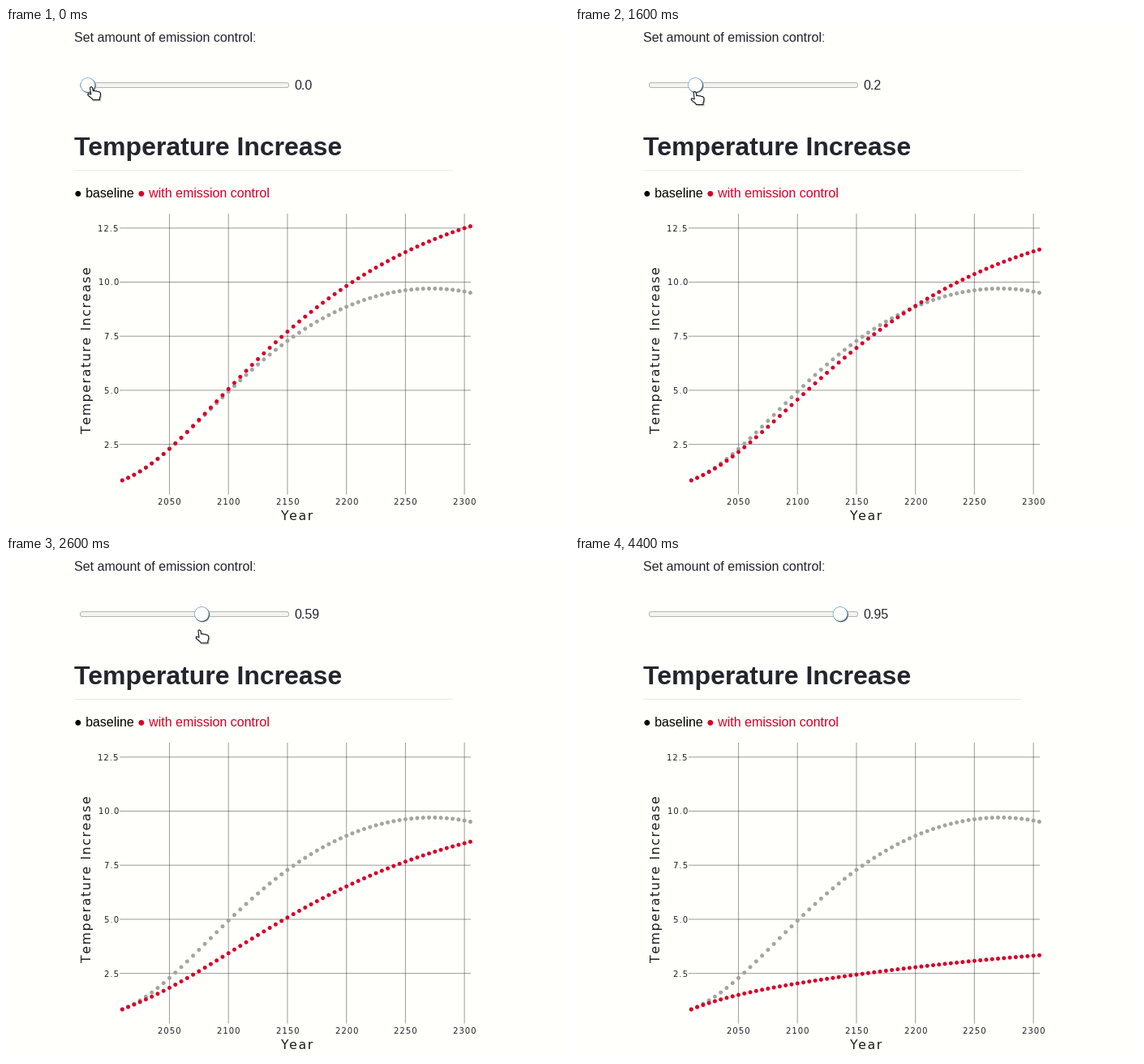
A matplotlib script for the animation above (4.8 s loop, 694x618 px).

```python
import numpy as np
import matplotlib.pyplot as plt
from matplotlib.animation import FuncAnimation
from matplotlib.patches import Circle, FancyBboxPatch, Polygon

W, H, DPI = 694, 618, 72  # at 72 dpi one point is one pixel
FRAMES, INTERVAL = 48, 100

PAPER, INK, AXIS_INK = "#fffffc", "#24252d", "#1c1c1c"
RED, GREY = "#d60027", "#a4a4a0"
SANS, PLOT_FONT = "Liberation Sans", "DejaVu Sans"

# Slider level and pointer x at the key ticks of the drag
KEYS = [5, 11, 16, 22, 29, 33]
LEVELS = [0, 0.1, 0.2, 0.45, 0.69, 0.95]
HAND_X = [100, 118, 142.5, 203, 256, 323]
EXIT_START, EXIT_STEPS = 40, 4

YEARS = np.arange(2010, 2306, 5)
CENTURIES = (YEARS - 2010) / 100


def year_x(year):
    return 201.5 + (year - 2050) * 1.4544


def temp_y(temp):
    return 513.6 - (temp - 2.5) * 26.68


def warming(share):
    """Temperature when this share of the emissions goes on."""
    c = CENTURIES
    carbon = c * (0.62 + 0.76 * c - 0.137 * c**2)
    response = 6 * (1 - np.exp(-c / 0.66))
    committed = 1.2 * (1 - np.exp(-c / 0.55))
    return 0.836 + committed + response * np.log(1 + carbon * share)


fig = plt.figure(figsize=(W / DPI, H / DPI), dpi=DPI, facecolor=PAPER)
ax = fig.add_axes([0, 0, 1, 1])
ax.set_xlim(0, W)
ax.set_ylim(H, 0)
ax.axis("off")


def write(x, y, text, size, color=INK, font=SANS, **kw):
    return ax.text(x, y, text, fontsize=size, color=color, family=font,
                   va="baseline", **kw)


def write_axis(x, y, text, size, **kw):
    """Chart text, letter-spaced with hair spaces."""
    write(x, y, "\u200a".join(text), size, AXIS_INK, PLOT_FONT, **kw)


def line(x0, y0, x1, y1, color, **kw):
    ax.plot([x0, x1], [y0, y1], color=color, snap=False,
            solid_capstyle="butt", **kw)


def points(temps):
    return np.column_stack([year_x(YEARS), temp_y(temps)])


def dots(temps, color):
    # One colour per dot keeps the dots at subpixel places
    return ax.scatter(*points(temps).T, s=25, linewidths=0, zorder=2.5,
                      facecolors=[color] * len(YEARS))


# Page text
write(84, 17, "Set amount of emission control:", 16)
write(84, 157, "Temperature Increase", 32, weight="bold")
line(84, 175.5, 551, 175.5, "#eaebe9", lw=1)
write(84, 209, "● baseline", 16, "black")
write(162, 209, "● with emission control", 16, RED)

# Chart
grid = dict(color="black", alpha=0.36, lw=1.1)
for temp in np.arange(2.5, 13, 2.5):
    y = temp_y(temp)
    line(140, y, 573, y, **grid)
    write_axis(139, y + 3.9, f"{temp}", 10.1, ha="right")
for year in range(2050, 2301, 50):
    x = year_x(year)
    line(x, 229, x, 575.5, **grid)
    write_axis(x + 0.3, 588.2, f"{year}", 10.1, ha="center")
write_axis(338, 607, "Year", 15.75)
write_axis(105, 500, "Temperature Increase", 15.75,
           rotation=90, rotation_mode="anchor")

dots(warming(1 - 0.01 * CENTURIES - 0.0525 * CENTURIES**2), GREY)
red_dots = dots(warming(1), RED)

# Slider
ax.add_patch(FancyBboxPatch((91.5, 67.5), 257, 6, snap=False,
                            boxstyle="round,pad=0,rounding_size=2.5",
                            fc="#f3f3f0", ec="#b4b5b2", lw=1, zorder=3))
thumb = [
    (Circle((0, 0), 9.3, fc="#c9cccb", lw=0, zorder=4), 1.0),
    (Circle((0, 0), 9.0, fc="#2b3d47", lw=0, zorder=4), 0.5),
    (Circle((0, 0), 8.6, fc="white", ec="#5f9fb9", lw=1, zorder=4), -0.2),
    (Circle((0, 0), 8.4, fc="white", lw=0, zorder=4), -0.2),
]
for disc, _ in thumb:
    ax.add_patch(disc)
value = write(355.5, 76, "0.0", 16)

# Pointing hand: finger, knuckles, wrist, thumb
HAND = np.array([
    (3.6, 1.6), (5, 0.4), (6.5, 1.5), (7.4, 5.8), (9, 5.3), (10.3, 6.1),
    (11.8, 5.7), (13.2, 6.6), (14.8, 6.6), (16.4, 8.2), (16.4, 12),
    (15.5, 14), (15.5, 16.6), (7, 16.6), (6.2, 15.2), (0.8, 10.7),
    (1.2, 8.9), (4.7, 9.8)])
shadow = Polygon(HAND, fc="black", ec="black", lw=2, alpha=0.13,
                 joinstyle="round", zorder=6)
hand = Polygon(HAND, fc="white", ec="#161616", lw=1.1,
               joinstyle="round", zorder=7)
ax.add_patch(shadow)
ax.add_patch(hand)


def hand_place(i, level):
    x, y = np.interp(i, KEYS, HAND_X), 72 + 29.5 * level
    s = max(0, i - EXIT_START + 1) / EXIT_STEPS
    return np.array([x - 113 * s, y + 58 * s - 129 * s**2])


def update(i):
    level = round(float(np.interp(i, KEYS, LEVELS)), 2)
    value.set_text(str(level))
    red_dots.set_offsets(points(warming(1 - level)))
    for disc, shift in thumb:
        disc.center = 101 + 238 * level + shift, 70.5 + shift

    place = hand_place(i, level)
    hand.set_xy(HAND + place)
    shadow.set_xy(HAND + place + [1, 1.3])
    for part in (hand, shadow):
        part.set_visible(i < EXIT_START + EXIT_STEPS)


anim = FuncAnimation(fig, update, frames=FRAMES, interval=INTERVAL,
                     init_func=lambda: update(0), repeat=True, repeat_delay=0)
plt.show()
```
